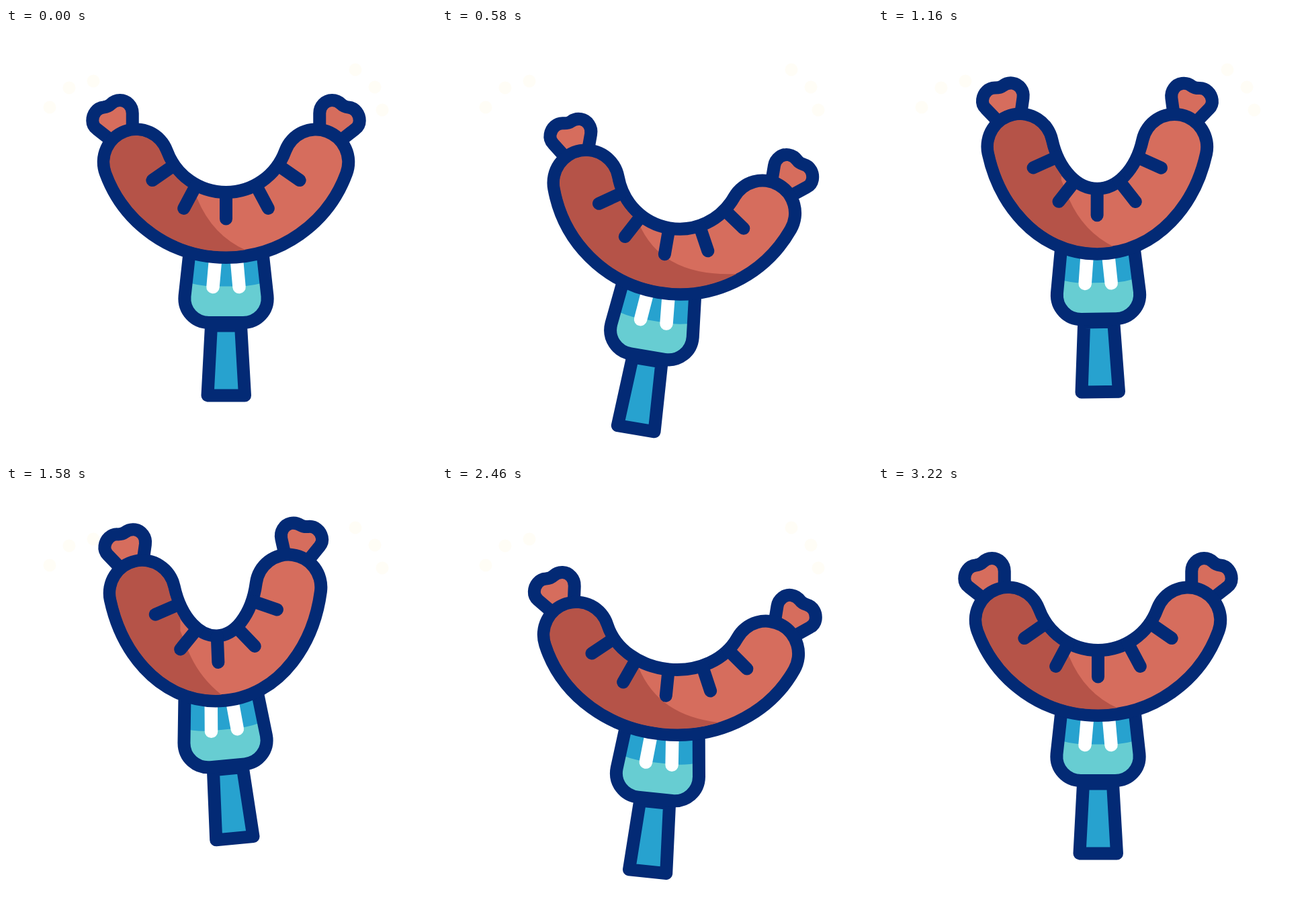
An HTML page for the animation above (3600 ms loop, 640 by 640 pixels).

```html
<!DOCTYPE html>
<html lang="en">
<head>
<meta charset="utf-8">
<title>Sausage on a fork</title>
<style>
  html, body { margin: 0; width: 100%; height: 100%; overflow: hidden; background: #fff; }
  svg { display: block; width: 100vw; height: 100vh; }
  .ink { fill: none; stroke: #032a75; stroke-width: 19; stroke-linecap: round; stroke-linejoin: round; }
  .meat { fill: #d66d5d; }
  .spine { fill: none; stroke-linecap: round; }
  .ray { fill: none; stroke: #ffe06a; stroke-width: 19; stroke-linecap: round; }
  .tine { stroke: #fff; stroke-width: 19.5; stroke-linecap: round; }
</style>
</head>
<body>
<svg viewBox="0 0 640 640">
  <defs>
    <path id="tip" class="ink" style="fill:#d66d5d" transform="translate(-193.5 -199.5)"
      d="M188 152V127C188 116 179.500 107.500 169.500 107.500C163 107.500 159 110 155.500 113.500C152 117 148.500 117.500 145 118C135 119 128.500 128 128.500 138C128.500 143 131 147.500 135 150.500L156 167"/>
    <path id="spine" class="spine"/>
    <path id="head" d="M273 335L266 399C264 421 281 438.500 302 438.500H353C374 438.500 391 421 389 399L382 335"/>
    <clipPath id="cup"><use href="#head"/></clipPath>
    <mask id="flesh" maskUnits="userSpaceOnUse" x="-400" y="-400" width="800" height="800">
      <use href="#spine" stroke="#fff" stroke-width="79"/>
    </mask>
  </defs>
  <g id="rays"></g>
  <g id="fork">
    <path class="ink" style="fill:#27a2cf" d="M305.500 443L300 547H355.500L349.500 443Z"/>
    <g clip-path="url(#cup)">
      <rect x="250" y="320" width="150" height="130" fill="#67cdd2"/>
      <path fill="#27a2cf" d="M250 320H400V372Q376 384.500 345 384.500H310Q279 384.500 255 372Z"/>
    </g>
    <path class="tine" d="M312 340L308 385.500"/>
    <path class="tine" d="M343 340L347 385.500"/>
    <use href="#head" class="ink"/>
  </g>
  <g id="sausage">
    <use id="tipL" href="#tip"/>
    <use id="tipR" href="#tip"/>
    <use href="#spine" stroke="#032a75" stroke-width="116"/>
    <use href="#spine" stroke="#d66d5d" stroke-width="78"/>
    <g mask="url(#flesh)"><path id="shade" fill="#b55348"/></g>
    <path id="marks" class="ink"/>
  </g>
</svg>
<script>
const LOOP = 3600, RAD = Math.PI / 180;
const $ = id => document.getElementById(id);
const set = (el, name, value) => el.setAttribute(name, value);

// time, joint x, joint y, fork angle, sausage angle, bend
const KEYS = [
  [160, 327.5, 293, 0, 0, 0],
  [320, 329, 304.8, 3.6, 3.4, 0],
  [700, 330, 355, 10.5, 11, 1],
  [800, 329.5, 331.5, 9.2, 9.8, 6.5],
  [1240, 325, 282.5, -2.5, -1, 19],
  [1580, 316.2, 271.4, -5.4, -2.3, 23],
  [1940, 314, 246, -5.8, -2.3, 20],
  [2120, 320.3, 268.4, -3.6, -1.7, 16],
  [2300, 327, 302, 2, 2.2, 2],
  [2460, 332.4, 321.1, 6, 5.7, -7.5],
  [2540, 332.5, 324, 6.4, 6, -9],
  [2790, 327.5, 293, 0, 0, 12],
  [3100, 327.5, 293, 0, 0, 0]
];

const rate = (i, k) => (KEYS[i + 1][k] - KEYS[i][k]) / (KEYS[i + 1][0] - KEYS[i][0]);

// Slope at a key: flat at turning points, otherwise a harmonic mean
function slope(i, k) {
  if (i === 0 || i === KEYS.length - 1) return 0;
  const a = rate(i - 1, k), b = rate(i, k);
  return a * b <= 0 ? 0 : 2 * a * b / (a + b);
}

function pose(time) {
  const last = KEYS.length - 1;
  if (time <= KEYS[0][0]) return KEYS[0].slice(1);
  if (time >= KEYS[last][0]) return KEYS[last].slice(1);
  const i = KEYS.findIndex(key => key[0] > time) - 1;
  const span = KEYS[i + 1][0] - KEYS[i][0], u = (time - KEYS[i][0]) / span, v = 1 - u;
  return [1, 2, 3, 4, 5].map(k =>
    KEYS[i][k] * (1 + 2 * u) * v * v + KEYS[i + 1][k] * u * u * (3 - 2 * u) +
    span * u * v * (v * slope(i, k) - u * slope(i + 1, k)));
}

// Point and unit tangent on the left half of the spine
function along(p, t) {
  const u = 1 - t;
  const at = k => u*u*u*p[0][k] + 3*u*u*t*p[1][k] + 3*u*t*t*p[2][k] + t*t*t*p[3][k];
  const dir = k => u*u*(p[1][k] - p[0][k]) + 2*u*t*(p[2][k] - p[1][k]) + t*t*(p[3][k] - p[2][k]);
  const dx = dir(0), dy = dir(1), len = Math.hypot(dx, dy);
  return { x: at(0), y: at(1), tx: dx / len, ty: dy / len };
}

function drawSausage(x, y, lean, turn, bend) {
  const half = 133.75 - 1.08 * bend, sag = 93.5 + bend;
  const endAngle = (69.8 + 0.45 * bend) * RAD, grip = 60;
  const p = [
    [-half, -sag],
    [-half + grip * Math.cos(endAngle), -sag + grip * Math.sin(endAngle)],
    [-grip, 0],
    [0, 0]
  ];
  set($('sausage'), 'transform', `translate(${x} ${y}) rotate(${turn})`);
  set($('spine'), 'd',
    `M${p[0]}C${p[1]} ${p[2]} 0,0C${grip},0 ${-p[1][0]},${p[1][1]} ${half},${-sag}`);

  const curl = 0.45 * bend;
  set($('tipL'), 'transform', `translate(${-half} ${-sag}) rotate(${curl})`);
  set($('tipR'), 'transform', `translate(${half} ${-sag}) scale(-1 1) rotate(${curl})`);

  let marks = 'M0,-48L0,-9';
  for (const t of [0.206, 0.6]) {
    const s = along(p, t);
    const point = d => [s.x + s.ty * d, s.y - s.tx * d];
    const [a, b] = [point(48), point(9)];
    marks += `M${a}L${b}M${-a[0]},${a[1]}L${-b[0]},${b[1]}`;
  }
  set($('marks'), 'd', marks);

  // Shadow edge sweeps along with the lean
  const sx = -44.5 + 0.8 * lean, sy = -43 - 1.3 * lean;
  const cx = -22 + 2 * lean, cy = 15 + lean;
  const ex = 30 + lean * (lean > 0 ? 8.2 : 5), ey = 38 - 0.2 * Math.max(lean, 0) ** 2;
  const ox = ex + (ex - cx) * 0.5, oy = ey + (ey - cy) * 0.5;
  set($('shade'), 'transform', `rotate(${-turn})`);
  set($('shade'), 'd',
    `M${sx - 8},-250L${sx - 8},${sy - 20}L${sx},${sy}Q${cx},${cy} ${ex},${ey}L${ox},${oy}V150H-260V-250Z`);
}

// start x, start y, reach x, reach y, delay
const RAYS = [
  [65, 118, -38, -13, 0], [94, 89, -28, -26, 20], [130, 79, -11, -36, 40],
  [520, 62, 12, -31, 40], [549, 88, 31, -26, 20], [560, 122, 46, -14, 0]
].map(spec => {
  const el = document.createElementNS('http://www.w3.org/2000/svg', 'path');
  set(el, 'class', 'ray');
  $('rays').append(el);
  return { el, spec };
});

const ease = u => { u = Math.min(1, Math.max(0, u)); return u * u * (3 - 2 * u); };

function drawRays(time) {
  for (const { el, spec: [x, y, dx, dy, delay] } of RAYS) {
    const begin = 2820 + delay;
    const front = ease((time - begin) / 200), back = ease((time - begin - 130) / 210);
    set(el, 'd', `M${x + dx * back},${y + dy * back}L${x + dx * front + 0.01},${y + dy * front}`);
    set(el, 'opacity', time <= begin ? 0.06 : back < 1 ? 1 : 0);
  }
}

function draw(time) {
  const [x, y, lean, turn, bend] = pose(time);
  set($('fork'), 'transform', `translate(${x} ${y}) rotate(${lean}) translate(-327.5 -293)`);
  drawSausage(x, y, lean, turn, bend);
  drawRays(time);
}

const t0 = performance.now();
function tick() {
  const time = (performance.now() - t0) % LOOP;
  draw(Math.floor(time / 20) * 20);
  requestAnimationFrame(tick);
}
tick();
</script>
</body>
</html>
```
